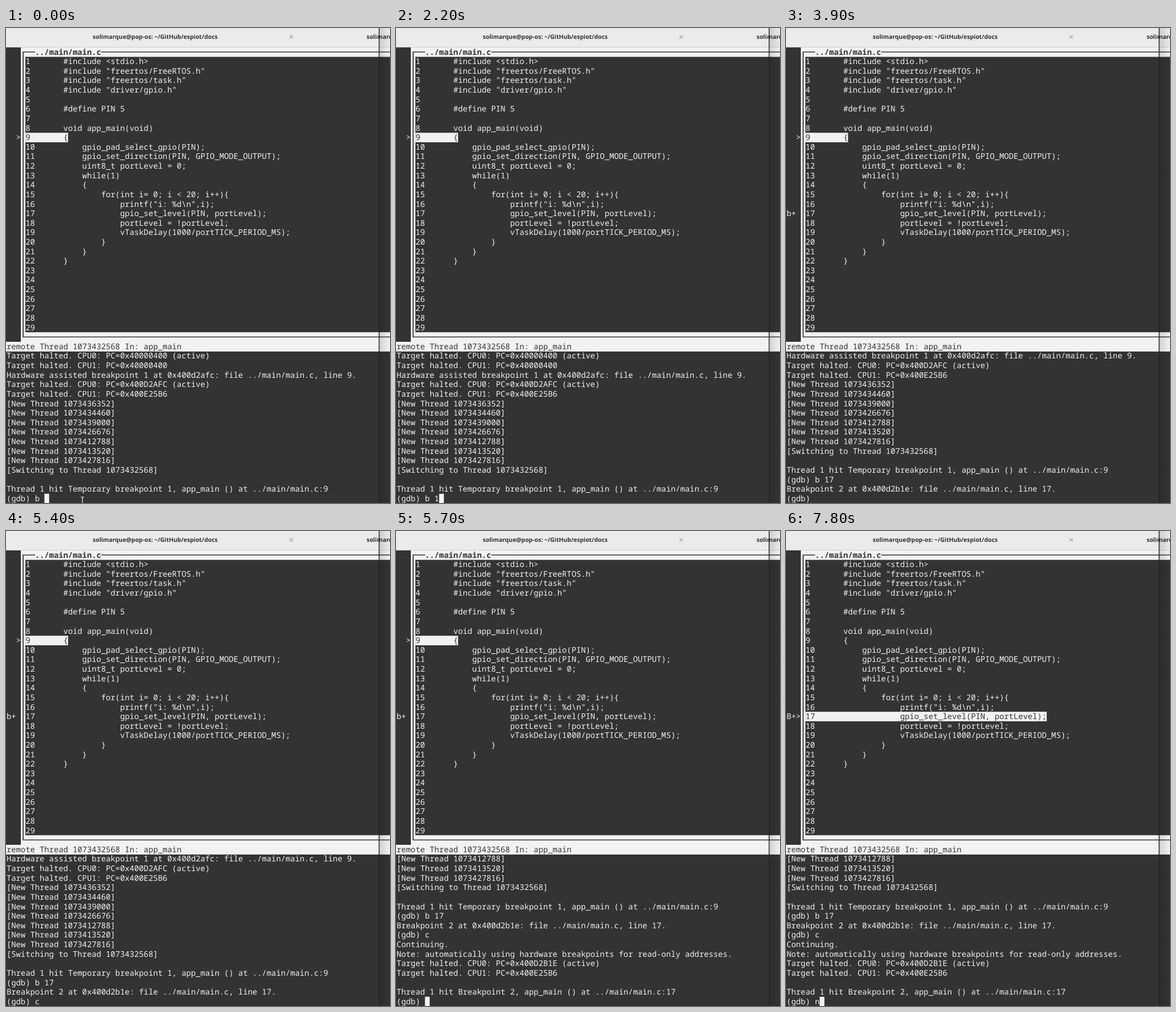
Write an HTML page that moves like this. It is 673 px wide and 831 px high and loops after 8000 ms.

```html
<!DOCTYPE html>
<html lang="en">
<head>
<meta charset="utf-8">
<title>Debugger session</title>
<style>
  html, body { margin: 0; width: 100%; height: 100%; overflow: hidden; background: #333; }
  svg { display: block; width: 673px; height: 831px; }
  text { white-space: pre; text-rendering: geometricPrecision; }
  .term text { font: 13.82px "Noto Sans Mono", monospace; fill: #f2f2f2; }
  .term text.dark { fill: #333; }
  .term text.bold { font-weight: 700; }
  .tab text { font: 700 10.4px "Noto Sans", sans-serif; fill: #303030; }
  .light { fill: #f2f2f2; }
  .line { fill: none; stroke: #333; stroke-width: 1.7; }
</style>
</head>
<body>
<svg viewBox="0 0 673 831">
  <defs>
    <linearGradient id="shade">
      <stop offset="0" stop-color="#000" stop-opacity=".13"/>
      <stop offset="1" stop-color="#000" stop-opacity="0"/>
    </linearGradient>
  </defs>
  <rect width="673" height="831" fill="#333"/>
  <g class="tab">
    <rect width="673" height="33.7" fill="#ebebeb"/>
    <rect y="33" width="673" height="1" fill="#cfcfcf"/>
    <text x="261.5" y="19" text-anchor="middle">solimarque@pop-os: ~/GitHub/espiot/docs</text>
    <text x="632" y="19">solimarque@pop-os: ~/GitHub/espiot/docs</text>
    <path d="M497 12.5l6 6m0 -6l-6 6" stroke="#aaa" stroke-width="1.3"/>
  </g>
  <path class="light" d="M26 34H673V50.5H34V532.3H673V549H26Z"/>
  <path class="line" d="M51 42H30V540.5H673M167 42H673"/>
  <rect class="light" y="549" width="673" height="17"/>
  <g class="term" id="fixed"></g>
  <g class="term" id="live"></g>
  <g id="pointer" fill="none" stroke="#f2f2f2" stroke-width="1.2">
    <path d="M131.3 820.3q2.7 0 2.7 2v9m0 -9q0 -2 2.7 -2"/>
  </g>
  <rect x="655" width="18" height="831" fill="url(#shade)"/>
  <rect x="653.2" width="1.5" height="831" fill="#222"/>
</svg>
<script>
const CELL = 8.29, ROW = 16.62, LEFT = 1, TOP = 33.7, LOOP = 8000;
const LOG_ROW = 32, LOG_SIZE = 15, PROMPT_ROW = 47;

const code = String.raw`#include <stdio.h>
#include "freertos/FreeRTOS.h"
#include "freertos/task.h"
#include "driver/gpio.h"

#define PIN 5

void app_main(void)
{
    gpio_pad_select_gpio(PIN);
    gpio_set_direction(PIN, GPIO_MODE_OUTPUT);
    uint8_t portLevel = 0;
    while(1)
    {
        for(int i= 0; i < 20; i++){
            printf("i: %d\n",i);
            gpio_set_level(PIN, portLevel);
            portLevel = !portLevel;
            vTaskDelay(1000/portTICK_PERIOD_MS);
        }
    }
}`.split("\n");

const log = `Target halted. CPU0: PC=0x40000400 (active)
Target halted. CPU1: PC=0x40000400
Hardware assisted breakpoint 1 at 0x400d2afc: file ../main/main.c, line 9.
Target halted. CPU0: PC=0x400D2AFC (active)
Target halted. CPU1: PC=0x400E25B6
[New Thread 1073436352]
[New Thread 1073434460]
[New Thread 1073439000]
[New Thread 1073426676]
[New Thread 1073412788]
[New Thread 1073413520]
[New Thread 1073427816]
[Switching to Thread 1073432568]

Thread 1 hit Temporary breakpoint 1, app_main () at ../main/main.c:9
(gdb) b 17
Breakpoint 2 at 0x400d2b1e: file ../main/main.c, line 17.
(gdb) c
Continuing.
Note: automatically using hardware breakpoints for read-only addresses.
Target halted. CPU0: PC=0x400D2B1E (active)
Target halted. CPU1: PC=0x400E25B6

Thread 1 hit Breakpoint 2, app_main () at ../main/main.c:17`.split("\n");

// [start ms, log lines printed, prompt line, cursor shown, current source line]
const steps = [
  [0, 15, "(gdb) b ", 1, 9],
  [400, 15, "(gdb) b ", 0, 9],
  [1000, 15, "(gdb) b ", 1, 9],
  [1600, 15, "(gdb) b ", 0, 9],
  [2200, 15, "(gdb) b 1", 1, 9],
  [2300, 15, "(gdb) b 17", 1, 9],
  [3100, 15, "(gdb) b 17", 0, 9],
  [3200, 17, "(gdb) ", 1, 9],
  [3900, 17, "(gdb) ", 0, 9],
  [4500, 17, "(gdb) ", 1, 9],
  [4800, 17, "(gdb) c", 1, 9],
  [5400, 17, "(gdb) c", 0, 9],
  [5600, 20, "", 1, 9],
  [5700, 24, "(gdb) ", 1, 9],
  [5800, 24, "(gdb) ", 1, 17],
  [6200, 24, "(gdb) ", 0, 17],
  [6800, 24, "(gdb) ", 1, 17],
  [7400, 24, "(gdb) ", 0, 17],
  [7800, 24, "(gdb) n", 1, 17]
];

const fixed = document.getElementById("fixed");
const live = document.getElementById("live");
const pointer = document.getElementById("pointer");

function add(parent, tag, attrs) {
  const el = document.createElementNS("http://www.w3.org/2000/svg", tag);
  for (const key in attrs) el.setAttribute(key, attrs[key]);
  return parent.appendChild(el);
}

function print(parent, col, row, str, style = "") {
  const at = { x: LEFT + col * CELL, y: TOP + row * ROW + 12.9, class: style };
  add(parent, "text", at).textContent = str;
}

function block(col, row, cols) {
  add(live, "rect", {
    x: LEFT + col * CELL, y: TOP + row * ROW,
    width: cols * CELL, height: ROW, class: "light"
  });
}

const sourceLine = n => String(n).padEnd(8) + (code[n - 1] || "");

function render([start, count, prompt, cursor, current]) {
  live.replaceChildren();
  const src = sourceLine(current);
  block(4, current, src.length);
  print(live, 4, current, src, "dark");

  // Only one of the two stop lines is highlighted at a time.
  const other = 26 - current;
  print(live, 4, other, sourceLine(other));
  print(live, 2, current, ">");
  if (count > 15) print(live, 0, 17, current === 17 ? "B+" : "b+");

  log.slice(count - LOG_SIZE, count).forEach((s, i) => print(live, 0, LOG_ROW + i, s));
  print(live, 0, PROMPT_ROW, prompt);
  if (cursor) block(prompt.length, PROMPT_ROW, 1);
  pointer.style.display = start < 2200 ? "" : "none";
}

print(fixed, 6, 0, "../main/main.c", "dark bold");
for (let n = 1; n <= 29; n++) {
  if (n !== 9 && n !== 17) print(fixed, 4, n, sourceLine(n));
}
print(fixed, 0, 31, "remote Thread 1073432568 In: app_main", "dark");

let shown;
function tick() {
  const t = performance.now() % LOOP;
  const step = steps.findLast(s => s[0] <= t);
  if (step !== shown) render(shown = step);
  requestAnimationFrame(tick);
}
tick();
</script>
</body>
</html>
```
